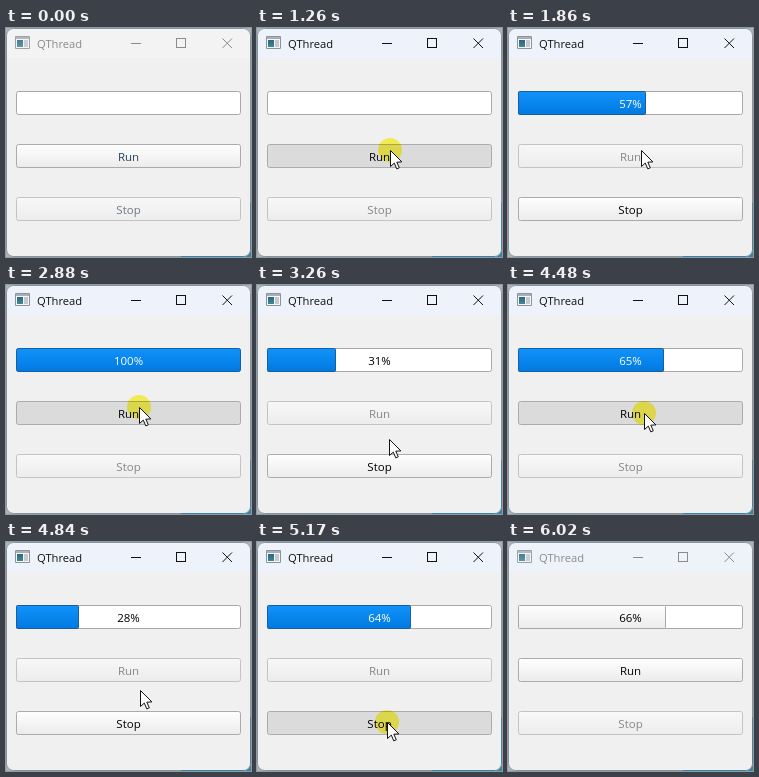
An HTML page with a canvas that plays this animation: 245 px wide and 229 px high, repeating every 6.05 s.

```html
<!DOCTYPE html>
<html lang="en">
<head>
<meta charset="utf-8">
<title>QThread</title>
<style>
  html, body { margin: 0; width: 100%; height: 100%; overflow: hidden; background: #f0f0f0; }
  canvas { display: block; width: 245px; height: 229px; }
</style>
</head>
<body>
<canvas id="stage" width="245" height="229"></canvas>
<script>
const ctx = document.getElementById('stage').getContext('2d');
const W = 245, H = 229, LOOP = 6050;
const ACTIVE_FROM = 1260, ACTIVE_TO = 5860;
const FONT = '"Open Sans", "Noto Sans", sans-serif';
const LEFT = 10, WIDTH = 225, HEIGHT = 24;
const BAR_Y = 63, RUN_Y = 116, STOP_Y = 169;

// Worker runs: time span, percent per millisecond, final value
const runs = [
  { from: 1320, to: 2270, rate: 0.1056, max: 100 },
  { from: 2960, to: 3590, rate: 0.1056, max: 65 },
  { from: 4580, to: 5200, rate: 0.109, max: 66 }
];

const presses = [
  { from: 1260, to: 1320, button: 'run' },
  { from: 2880, to: 2960, button: 'run' },
  { from: 3500, to: 3590, button: 'stop' },
  { from: 4480, to: 4580, button: 'run' },
  { from: 5110, to: 5200, button: 'stop' }
];

const easeOut = u => 1 - (1 - u) ** 2;
const easeIn = u => u ** 1.6;
const easeBoth = u => u * u * (3 - 2 * u);

const moves = [
  { from: 140, to: 510, a: [212, 232], b: [133, 122], ease: easeOut },
  { from: 3040, to: 3470, a: [133, 122], b: [132, 183], ease: easeBoth },
  { from: 3870, to: 4330, a: [132, 183], b: [136, 128], ease: easeBoth },
  { from: 4660, to: 5090, a: [136, 128], b: [130, 180], ease: easeBoth },
  { from: 5380, to: 5610, a: [130, 180], b: [228, 232], ease: easeIn }
];

const during = (span, t) => t >= span.from && t < span.to;
const lastStarted = (list, t) => list.filter(item => t >= item.from).pop();

function progressAt(t) {
  const run = lastStarted(runs, t);
  return run ? Math.min(run.max, Math.floor((t - run.from) * run.rate)) : -1;
}

function pointerAt(t) {
  const move = lastStarted(moves, t);
  if (!move) return null;
  const u = move.ease(Math.min(1, (t - move.from) / (move.to - move.from)));
  return move.a.map((v, i) => v + (move.b[i] - v) * u);
}

function vertical(y, h, top, bottom) {
  const g = ctx.createLinearGradient(0, y, 0, y + h);
  g.addColorStop(0, top);
  g.addColorStop(1, bottom);
  return g;
}

function box(x, y, w, h, r, fill, stroke) {
  ctx.beginPath();
  ctx.roundRect(x + 0.5, y + 0.5, w - 1, h - 1, r);
  ctx.fillStyle = fill;
  ctx.fill();
  ctx.strokeStyle = stroke;
  ctx.lineWidth = 1;
  ctx.stroke();
}

function line(color, ...points) {
  ctx.beginPath();
  points.forEach(([x, y], i) => i ? ctx.lineTo(x, y) : ctx.moveTo(x, y));
  ctx.strokeStyle = color;
  ctx.lineWidth = 1;
  ctx.stroke();
}

function label(text, x, y, color, align = 'center', size = 11.5) {
  ctx.font = `${size}px ${FONT}`;
  ctx.textAlign = align;
  ctx.fillStyle = color;
  ctx.fillText(text, x, y);
}

function drawWindow(t, active) {
  ctx.fillStyle = '#a9b4bc';
  ctx.fillRect(0, 0, W, H);
  ctx.fillStyle = '#2f86ae';
  ctx.fillRect(175, 215, 70, 14);

  ctx.save();
  ctx.beginPath();
  ctx.roundRect(0.5, 0.5, W - 1, H - 1, 7);
  ctx.clip();
  ctx.fillStyle = '#f0f0f0';
  ctx.fillRect(0, 0, W, H);
  ctx.fillStyle = active ? '#eef3fb' : t < ACTIVE_FROM ? '#f3f3f3' : '#edf3f8';
  ctx.fillRect(0, 0, W, 30);
  ctx.restore();

  ctx.beginPath();
  ctx.roundRect(0.5, 0.5, W - 1, H - 1, 7);
  ctx.strokeStyle = '#8296a3';
  ctx.lineWidth = 1;
  ctx.stroke();
  line('#2f86ae', [175, 228.5], [238, 228.5]);
  line('#4a87a4', [244.5, 175], [244.5, 222]);

  drawIcon(active);
  const ink = active ? '#111111' : '#8b8b8b';
  label('QThread', 31, 20, ink, 'left', 11.2);
  line(ink, [125, 15.5], [135, 15.5]);
  ctx.strokeRect(170.5, 10.5, 9, 9);
  line(ink, [216.5, 10.5], [226, 20]);
  line(ink, [226, 10.5], [216.5, 20]);
}

function drawIcon(active) {
  ctx.globalAlpha = active ? 1 : 0.85;
  box(9, 8, 15, 13, 0, '#f4f6f7', '#8c9498');
  ctx.fillStyle = '#a9b0b4';
  ctx.fillRect(10, 9, 13, 2);
  ctx.fillStyle = vertical(11, 8, '#2c5e86', '#3e8a90');
  ctx.fillRect(11, 12, 6, 7);
  ctx.fillStyle = '#c3c9cc';
  ctx.fillRect(18, 12, 4, 7);
  ctx.globalAlpha = 1;
}

function drawButton(text, y, { enabled, pressed, ink }) {
  const fill = pressed ? '#dbdbdb'
    : enabled ? vertical(y, HEIGHT, '#ffffff', '#ebebeb')
    : vertical(y, HEIGHT, '#f8f8f8', '#ececec');
  box(LEFT, y, WIDTH, HEIGHT, 2, fill, enabled ? '#ababab' : '#c3c3c3');
  label(text, 122.5, y + 17, ink || (enabled ? '#000000' : '#868686'));
}

function drawProgress(value, active) {
  box(LEFT, BAR_Y, WIDTH, HEIGHT, 2, '#ffffff', '#a8a8a8');
  if (value < 0) return;
  const chunk = Math.floor(WIDTH * value / 100);
  const text = color => label(value + '%', 122.5, BAR_Y + 17, color);
  text('#000000');
  if (chunk < 2) return;

  ctx.save();
  ctx.beginPath();
  ctx.rect(LEFT, BAR_Y, chunk, HEIGHT);
  ctx.clip();
  const fill = active
    ? vertical(BAR_Y, HEIGHT, '#1193fb', '#0079e0')
    : vertical(BAR_Y, HEIGHT, '#ffffff', '#ebebeb');
  box(LEFT, BAR_Y, chunk, HEIGHT, value === 100 ? 2 : 1, fill, active ? '#175f9f' : '#a3a8ae');
  text(active ? '#ffffff' : '#000000');
  ctx.restore();
}

function drawPointer([x, y], clicking) {
  if (clicking) {
    ctx.globalCompositeOperation = 'multiply';
    ctx.fillStyle = '#fffa58';
    ctx.beginPath();
    ctx.arc(x, y, 12, 0, Math.PI * 2);
    ctx.fill();
    ctx.globalCompositeOperation = 'source-over';
  }
  ctx.save();
  ctx.translate(Math.round(x) + 0.5, Math.round(y) + 0.5);
  ctx.beginPath();
  [[0, 0], [0, 16], [3.8, 12.6], [6.3, 18.4], [8.8, 17.3], [6.3, 11.7], [11.4, 11.4]]
    .forEach(p => ctx.lineTo(...p));
  ctx.closePath();
  ctx.fillStyle = '#ffffff';
  ctx.fill();
  ctx.strokeStyle = '#111111';
  ctx.lineWidth = 1;
  ctx.stroke();
  ctx.restore();
}

function draw(t) {
  const active = t >= ACTIVE_FROM && t < ACTIVE_TO;
  const running = runs.some(run => during(run, t));
  const press = presses.find(p => during(p, t));
  const pointer = pointerAt(t);

  drawWindow(t, active);
  drawProgress(progressAt(t), active);
  drawButton('Run', RUN_Y, {
    enabled: !running,
    pressed: press?.button === 'run',
    ink: t < 400 ? '#24405e' : null
  });
  drawButton('Stop', STOP_Y, {
    enabled: running,
    pressed: press?.button === 'stop',
    ink: t < ACTIVE_FROM ? '#6b7989' : null
  });
  if (pointer && t < 5640) drawPointer(pointer, press);
}

function tick() {
  draw(performance.now() % LOOP);
  requestAnimationFrame(tick);
}
tick();
</script>
</body>
</html>
```
